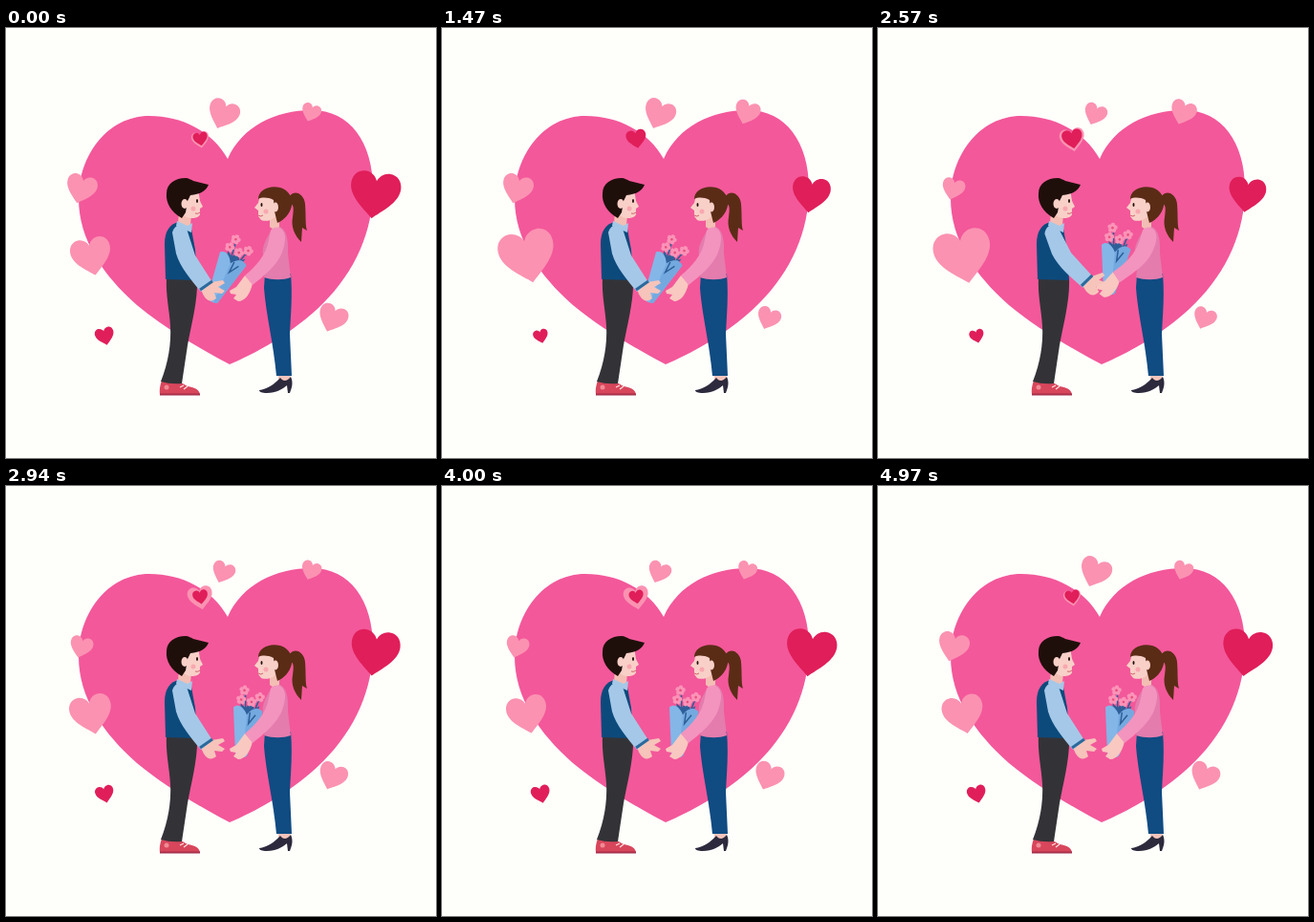
Animation of 450 by 450 pixels, one loop 5000 ms. Source, as an HTML page:

```html
<!DOCTYPE html>
<html lang="en">
<head>
<meta charset="utf-8">
<title>Bouquet</title>
<style>
  html, body { margin: 0; width: 100%; height: 100%; overflow: hidden; background: #fefefb; }
  svg { display: block; width: 100vw; height: 100vh; }
</style>
</head>
<body>
<svg viewBox="0 0 450 450">
  <defs>
    <path id="heart" d="M0 .95C-.35 .62-1 .2-1-.35C-1-.7-.76-.9-.5-.9C-.26-.9-.08-.75 0-.55C.08-.75.26-.9.5-.9C.76-.9 1-.7 1-.35C1 .2.35.62 0 .95Z"/>
    <g id="flower">
      <circle cy="-3" r="2.3"/><circle cx="2.9" cy="-.9" r="2.3"/><circle cx="1.8" cy="2.4" r="2.3"/>
      <circle cx="-1.8" cy="2.4" r="2.3"/><circle cx="-2.9" cy="-.9" r="2.3"/>
      <circle r="1.3" fill="#e8507a"/>
    </g>
  </defs>

  <path fill="#f3589a" d="M232 137C216 108 184 92 150 92C106 92 76 134 76 178C76 222 102 259 137 290C166 314 205 337 234 352C258 342 300 320 332 288C366 254 384 212 384 168C384 120 360 86 320 86C282 86 247 103 232 137Z"/>
  <g id="hearts"></g>

  <g id="man">
    <path fill="#d8465c" d="M163 369L183 371L190 375C198 376 203 379 203 384L161 384Q160 377 163 369Z"/>
    <path fill="#a8304a" d="M161 382.500H203V384.500H161Z"/>
    <circle cx="168" cy="376" r="2.500" fill="#f08a94"/>
    <path stroke="#ffe3e0" stroke-width="1.200" d="M182 376L186 374M186 378L190 375"/>
    <path fill="#333337" d="M168 261L200 262C201 285 194 310 190 332L184 372Q172 373 162 370C170 350 173 330 172 312C171 295 167 280 168 261Z"/>
    <path fill="#0d4a7c" d="M181 203C171 205 166 213 166 226L167 263L200 264L198 232L193 205Z"/>
    <path fill="#f3bfb4" d="M181 192L194 194L193 207L186 209L180 205Z"/>
    <path fill="#a5c8e8" d="M179 202L190 207L195 204L194 214L178 207Z"/>
    <path fill="#f9d0c8" d="M181 172L201 168L203 181L206 187L203 189L203 195C202 199 194 200 189 198C184 195 181 188 181 172Z"/>
    <path fill="#1f0f0b" d="M168 173C168 163 177 157 188 157C191 157 194 159 196 160L212 164C209 171 203 174 193 175L190 181L188 193L184 199C173 193 167 183 168 173Z"/>
    <ellipse cx="187" cy="184" rx="3.500" ry="5" fill="#f9d0c8"/>
    <ellipse cx="200" cy="181" rx="1" ry="2" fill="#1f0f0b"/>
    <circle cx="196" cy="189" r="2.500" fill="#f8a8b0"/>
    <path fill="none" stroke="#d0606a" d="M198 194Q201 195 203 193"/>
  </g>

  <g id="woman">
    <path fill="#5a2c16" d="M296 177C302 168 312 174 313 184C314 196 313 206 315 212L310 209L309 224C302 217 298 208 300 198C301 190 302 184 296 183Z"/>
    <path fill="#f6c4bc" d="M285 362H298L297 371L285 372Z"/>
    <path fill="#2c2a3c" d="M265 379C273 378 281 373 287 366C290 370 294 370 298 365C301 371 299 377 297 382H295L294 374C289 378 283 382 273 382C268 382 265 381 265 379Z"/>
    <path fill="#104b82" d="M271 257L298 257C300 280 298 300 297 320L299 364L283 364C280 330 272 300 270 272Z"/>
    <path fill="#e47cae" d="M280 207C291 206 296 215 295 236L298 261C290 264 279 264 270 261L272 244C266 236 269 227 274 218Z"/>
    <path fill="#f3bfb4" d="M276 195L286 195L286 208C283 211 279 211 276 208Z"/>
    <path fill="#f9d0c8" d="M266 174L284 172L286 190C284 199 275 204 267 201L264 197L264 191L260 188L264 183Z"/>
    <path fill="#5a2c16" d="M264 179C264 169 276 164 287 167C296 170 301 178 299 186C297 195 291 201 284 204L281 192L280 180C274 177 268 177 264 179Z"/>
    <ellipse cx="282" cy="187.500" rx="3" ry="5" fill="#f9d0c8"/>
    <ellipse cx="267.500" cy="185" rx="1" ry="2" fill="#1f0f0b"/>
    <circle cx="272" cy="192" r="2.500" fill="#f8a8b0"/>
    <path fill="none" stroke="#d0606a" d="M264 196Q267 198 269 196"/>
  </g>

  <g id="bouquet">
    <path fill="none" stroke="#2d5f96" stroke-width="1.500" d="M0-35L-5-68M2-35L4-60M4-35L11-62"/>
    <path fill="#2f5f98" d="M-6-40L-8-54L-2-50L2-58L7-50L12-54L9-38Z"/>
    <g fill="#fb93b8">
      <use href="#flower" x="-6" y="-68"/><use href="#flower" x="11" y="-63"/>
      <use href="#flower" x="3" y="-57"/><use href="#flower" x="-8" y="-58"/>
    </g>
    <path fill="#84b6e8" d="M-6 0L-15-49C-10-54-4-50 0-43C5-51 11-53 16-48L6 0Q0 4-6 0Z"/>
    <path fill="#6aa0dc" opacity=".6" d="M0-43L2 2L6 0L16-48C11-53 5-51 0-43Z"/>
    <path fill="none" stroke="#2d5f96" stroke-width="1.500" d="M3-46L3-34L9-44"/>
  </g>

  <g id="manArm">
    <path fill="#f6c4ba" d="M204 273L215 266L227 264L229 267L222 271L229 275L226 278L218 277L220 283C214 288 208 286 204 273Z"/>
    <path fill="#a5c8e8" d="M174 214C177 204 187 203 190 213L198 238L216 266L204 276C194 264 182 250 178 236Z"/>
    <path stroke="#2b6a9c" stroke-width="3" d="M203 274L216 265"/>
  </g>
  <g id="womanArm">
    <path fill="#f9c8c0" d="M250 259L258 267C256 278 250 286 243 286L238 283L241 279L235 278L234 275L241 271Z"/>
    <path fill="#f394be" d="M277 212C283 205 293 209 292 222C290 238 284 249 258 269L250 259C262 249 272 238 275 222Z"/>
  </g>
</svg>

<script>
const LOOP = 5000;
const PINK = '#fb92b2', RED = '#e01e5a';
const $ = id => document.getElementById(id);

// x, y, tilt, colour, resting radius, peak radius, pulse kind
const hearts = [
  [227, 90.5, 22, PINK, 12, 16.5, 'burst'],
  [319, 88.5, 20, PINK, 10, 13.5, 'beat'],
  [203.5, 117, -10, PINK, 13, 9, 'burst'],
  [203.5, 116, -10, RED, 7.5, 10.7, 'beat'],
  [78.5, 168.5, 16, PINK, 12, 16.2, 'burst'],
  [89.5, 239, -12, PINK, 20.8, 30, 'beat'],
  [103.5, 322.5, -14, RED, 10, 7.6, 'beat'],
  [341.5, 304, 22, PINK, 15.5, 12.1, 'beat'],
  [386, 174.5, 8, RED, 26.5, 19.4, 'beat']
].map(([x, y, tilt, fill, rest, peak, kind]) => {
  const el = document.createElementNS('http://www.w3.org/2000/svg', 'use');
  el.setAttribute('href', '#heart');
  el.setAttribute('fill', fill);
  $('hearts').append(el);
  return { el, x, y, tilt, rest, peak, kind };
});

// time, then values
const manKeys = [[0, 0], [870, -4], [1470, 0], [2140, -15], [2400, -14], [2850, 0], [5000, 0]];
const womanKeys = [[0, 0], [1500, 0], [2140, 9], [2400, 8], [2850, 0], [5000, 0]];
const bouquetKeys = [
  [0, 216, 285, 26], [870, 219, 279, 24], [1470, 216, 285, 26], [2140, 238, 273, 8],
  [2400, 240, 275, 8], [2850, 246, 282, 8], [5000, 246, 282, 8]
];

const smooth = p => p * p * (3 - 2 * p);
const clamp = p => Math.min(1, Math.max(0, p));

function sample(keys, t) {
  const i = keys.findIndex(k => k[0] > t);
  const a = keys[i - 1], b = keys[i];
  const p = smooth((t - a[0]) / (b[0] - a[0]));
  return a.slice(1).map((v, n) => v + (b[n + 1] - v) * p);
}

const pulse = {
  beat: t => (1 - Math.cos(2 * Math.PI * (t / 1000 - 0.06))) / 2,
  burst: t => {
    const phase = t * 3 / LOOP % 1;
    const gap = Math.abs((phase - 0.94 + 1.5) % 1 - 0.5);
    return smooth(clamp((0.18 - gap) / 0.13));
  }
};

function draw() {
  const t = performance.now() % LOOP;
  for (const h of hearts) {
    const r = h.rest + (h.peak - h.rest) * pulse[h.kind](t);
    h.el.setAttribute('transform', `translate(${h.x} ${h.y}) rotate(${h.tilt}) scale(${r})`);
  }
  const [x, y, turn] = sample(bouquetKeys, t);
  $('bouquet').setAttribute('transform', `translate(${x} ${y}) rotate(${turn})`);
  $('manArm').setAttribute('transform', `rotate(${sample(manKeys, t)} 183 212)`);
  $('womanArm').setAttribute('transform', `rotate(${sample(womanKeys, t)} 285 213)`);
  requestAnimationFrame(draw);
}
draw();
</script>
</body>
</html>
```
